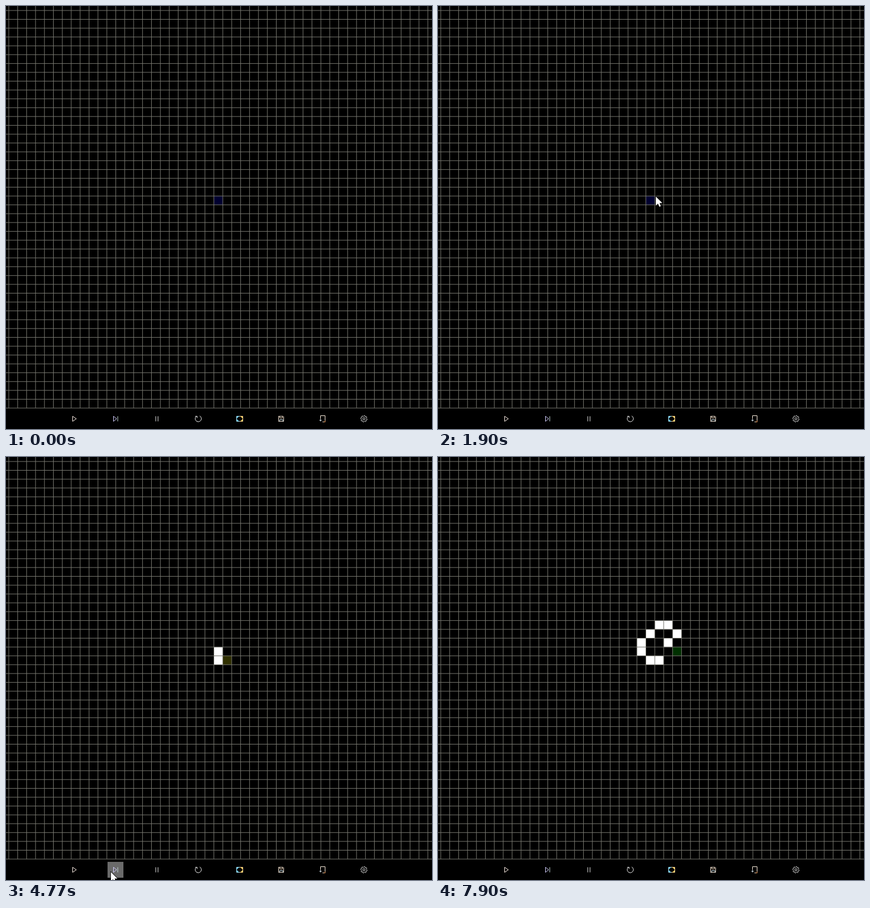
An HTML page with a canvas that plays this animation: 751 by 746 pixels, repeating every 8 s.

```html
<!DOCTYPE html>
<html>
<head>
<meta charset="utf-8">
<style>
html, body { margin: 0; width: 100%; height: 100%; overflow: hidden; background: #000; }
canvas { display: block; }
</style>
</head>
<body>
<canvas id="stage" width="751" height="746"></canvas>
<script>
const ctx = document.getElementById('stage').getContext('2d');
const W = 751, FLOOR = 709, LOOP = 8000, STEPS = 35;
const PITCH_X = 15.72, PITCH_Y = 15.581;

// centres of the grid lines; fractional, so the lines are antialiased
const colX = c => 4.9 + PITCH_X * c;
const rowY = r => 7.92 + PITCH_Y * r;

// headings: north, east, south, west
const MOVES = [[0, -1], [1, 0], [0, 1], [-1, 0]];
const ON_BLACK = ['#300000', '#303000', '#003000', '#000030'];
const ON_WHITE = ['#ffd0d0', '#ffffd0', '#d0ffd0', '#d0d0ff'];

// pointer path: time, x, y of the tip
const PATH = [
  [400, 330, 748], [830, 194, 731], [1529, 194, 731], [1530, 194, 728],
  [1730, 194, 728], [1900, 384, 336], [2370, 384, 336], [2830, 323, 658],
  [3170, 187, 732], [4400, 187, 732], [4500, 185, 732], [4785, 185, 732], [4900, 190, 748]
];

function stepsAt(t) {
  if (t < 3600) return 0;
  if (t < 4430) return 1;
  return Math.min(STEPS, Math.max(2, Math.floor((t - 7900) / 93.5 + 1e-6) + STEPS));
}

// Ant turns left on black, right on white
function runAnt(n) {
  const white = new Set();
  let x = 23, y = 21, dir = 3;
  for (; n > 0; n--) {
    const key = x + ',' + y;
    if (white.delete(key)) dir = (dir + 1) % 4;
    else { white.add(key); dir = (dir + 3) % 4; }
    x += MOVES[dir][0];
    y += MOVES[dir][1];
  }
  return { white, x, y, dir };
}

function fillCell(c, r, color) {
  ctx.fillStyle = color;
  ctx.fillRect(colX(c), rowY(r), PITCH_X, PITCH_Y);
}

function drawGrid() {
  ctx.fillStyle = '#787870';
  for (let c = 0; c < 48; c++) ctx.fillRect(colX(c) - 0.5, 0, 1, FLOOR);
  for (let r = 0; r < 46; r++) ctx.fillRect(0, rowY(r) - 0.5, W, 1);
}

function stroke(d, color = '#f4f4f4') {
  ctx.strokeStyle = color;
  ctx.lineWidth = 1;
  ctx.stroke(new Path2D(d));
}

function drawIcons() {
  stroke('M117.5 723.5L124 728L117.5 732.5Z', '#fff0e8');
  stroke('M189.5 723.5L195 728L189.5 732.5Z', '#d4d0ff');
  stroke('M197 723.5V732.5', '#c8dcd8');
  stroke('M264 723.5V732.5M268 723.5V732.5', '#e8e8e8');
  stroke('M341.5 723A5.4 5.4 0 1 1 336 723.3M333.8 723.5H337V726.5');
  stroke('M412 723.5H406.5V732.5H412', '#a8e4f4');
  stroke('M412 723.5H417.5V732.5H412', '#f4cc88');
  ctx.fillStyle = '#60c0e8';
  ctx.fill(new Path2D('M407 724H410.5L407 727.5ZM407 732H410.5L407 728.5Z'));
  ctx.fillStyle = '#f0d060';
  ctx.fill(new Path2D('M417 724H413.5L417 727.5ZM417 732H413.5L417 728.5Z'));
  stroke('M480.5 723.5H488.5L489.5 724.5V732.5H480.5Z', '#f4e4d4');
  stroke('M482.5 723.5V726.5H487.5V723.5', '#f0d8c0');
  stroke('M482.5 732.5V729.5H488V732.5', '#d0e4ec');
  stroke('M554.5 728V722.5H562.5V733.5H558', '#fff0e0');
  stroke('M552.5 730.5H556.5M554.5 728.5V732.5', '#d8e4f0');
  stroke('M560 733.5H562.5V731', '#f0a060');

  let gear = '';
  for (let i = 0; i < 32; i++) {
    const a = (i + 0.5) * Math.PI / 16, r = i % 4 < 2 ? 5.8 : 4.5;
    gear += (i ? 'L' : 'M') + (631 + r * Math.cos(a)) + ' ' + (728 + r * Math.sin(a));
  }
  stroke(gear + 'Z', '#dcdcdc');
  stroke('M633 728A2 2 0 1 1 629 728A2 2 0 1 1 633 728', '#dcdcdc');
}

function drawPointer(t) {
  const i = PATH.findIndex(p => p[0] > t);
  if (i < 1) return;
  const [t0, x0, y0] = PATH[i - 1], [t1, x1, y1] = PATH[i];
  const k = (t - t0) / (t1 - t0);
  ctx.save();
  ctx.translate(x0 + (x1 - x0) * k, y0 + (y1 - y0) * k);
  const arrow = new Path2D('M0 0V16L3.8 12.6L6.3 18L8.8 17L6.5 11.6H11.5Z');
  ctx.strokeStyle = '#000';
  ctx.lineWidth = 1.5;
  ctx.stroke(arrow);
  ctx.fillStyle = '#fff';
  ctx.fill(arrow);
  ctx.restore();
}

function draw(now) {
  const t = now % LOOP;
  ctx.fillStyle = '#000';
  ctx.fillRect(0, 0, W, 746);
  const ant = runAnt(stepsAt(t));
  for (const key of ant.white) fillCell(...key.split(',').map(Number), '#fff');
  const tints = ant.white.has(ant.x + ',' + ant.y) ? ON_WHITE : ON_BLACK;
  fillCell(ant.x, ant.y, tints[ant.dir]);
  drawGrid();
  if (t >= 3100 && t < 5620) {
    ctx.fillStyle = '#6a6a6a';
    ctx.fillRect(179, 714, 28, 28);
  }
  drawIcons();
  drawPointer(t);
}

let start;
function loop(now) {
  start ??= now;
  draw(now - start);
  requestAnimationFrame(loop);
}
requestAnimationFrame(loop);
</script>
</body>
</html>
```
